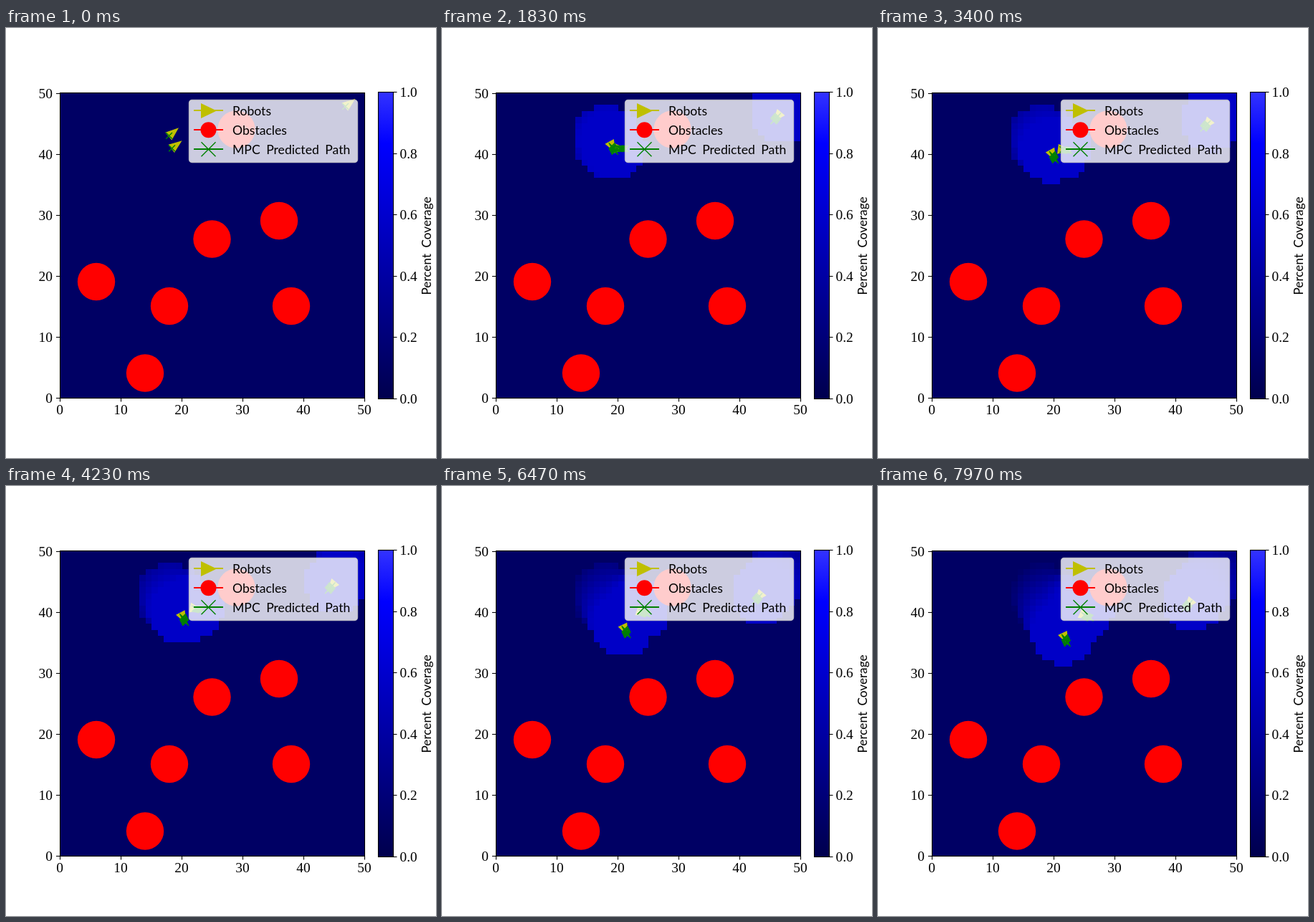
Recreate the animation shown at these times as an HTML page with a canvas. Size 600 px wide and 600 px high, loop 8000 ms.

```html
<!DOCTYPE html>
<html lang="en">
<head>
<meta charset="utf-8">
<title>Coverage map</title>
<style>
  html, body { margin: 0; width: 100%; height: 100%; overflow: hidden; background: #fff; }
  canvas, svg { position: absolute; left: 0; top: 0; width: 600px; height: 600px; }
  .tick { font: 19.4px "Liberation Serif", serif; }
  .label { font: 17.6px Lato, sans-serif; word-spacing: 4px; }
  .frame { fill: none; stroke: #000; stroke-width: 1.1; }
</style>
</head>
<body>
<canvas id="map" width="600" height="600"></canvas>
<svg viewBox="0 0 600 600">
  <defs>
    <linearGradient id="scale" x1="0" y1="1" x2="0" y2="0">
      <stop offset="0" stop-color="#00004d"/>
      <stop offset=".833" stop-color="#00f"/>
      <stop offset="1" stop-color="#3333ff"/>
    </linearGradient>
  </defs>
  <g id="obstacles" fill="red"></g>
  <rect class="frame" x="75.5" y="90.5" width="425" height="426"/>
  <rect class="frame" x="519.5" y="89.5" width="21" height="428" style="fill:url(#scale)"/>
  <g id="ticks"></g>
  <rect x="255.5" y="100.5" width="235" height="87" rx="4" fill="#fff" fill-opacity=".8" stroke="#ccc" stroke-opacity=".8" stroke-width="1.4"/>
  <g stroke-width="2">
    <path d="M262 115h41" stroke="#bfbf00"/>
    <path d="M262 142h41" stroke="red"/>
    <path d="M262 169h41" stroke="green"/>
  </g>
  <path d="M272 105v21l22-10.5z" fill="#bfbf00"/>
  <circle cx="282.5" cy="142.3" r="11" fill="red"/>
  <path d="M272.5 159.3l20 20m0-20l-20 20" stroke="green" stroke-width="1.4"/>
  <g class="label">
    <text x="316" y="122">Robots</text>
    <text x="316" y="149">Obstacles</text>
    <text x="316" y="176">MPC Predicted Path</text>
    <text transform="translate(592.5 304) rotate(-90)" text-anchor="middle" style="font-size:17.2px">Percent Coverage</text>
  </g>
</svg>
<script>
const FRAMES = 240, LOOP = 8000, GRID = 50;
const REACH_SQ = 26.5, FRESH = 0.57, BASE = 0.108, DECAY = 0.002;
const TURN = 4.2, RAMP = 30;
const px = x => 75 + 8.5 * x;
const py = y => 515.5 - 8.5 * y;
const colEdge = c => Math.round(px(c) + 0.5);
const rowEdge = r => Math.floor(py(r));

// Each robot turns clockwise to its goal heading, which then bends slowly
const robots = [
  { x: 17.95, y: 42.95, heading: 40, goal: -60, bend: -0.02, speed: 0.0335 },
  { x: 18.42, y: 40.9, heading: 37, goal: 4, bend: -0.12, speed: 0.0275 },
  { x: 46.9, y: 47.77, heading: 38, goal: -130, bend: 0, speed: 0.034 }
];

function drive({ x, y, heading, goal, bend, speed }) {
  const rad = Math.PI / 180;
  return Array.from({ length: FRAMES }, (_, f) => {
    const aim = goal + bend * f;
    const angle = Math.max(aim, heading - TURN * f) * rad;
    const step = speed * Math.min(1, f / RAMP);
    x += step * Math.cos(angle);
    y += step * Math.sin(angle);
    return { x, y, angle, aim: aim * rad };
  });
}
const paths = robots.map(drive);

const ctx = document.getElementById('map').getContext('2d');

function shade(value) {
  return `rgb(0,0,${Math.round(77 + 178 * value / 0.833)})`;
}

function drawCoverage(frame) {
  const seen = new Map();
  for (let f = 1; f <= frame; f++) {
    for (const path of paths) {
      const { x, y } = path[f];
      for (let c = Math.floor(x) - 6; c <= x + 6; c++) {
        for (let r = Math.floor(y) - 6; r <= y + 6; r++) {
          if (c < 0 || r < 0 || c >= GRID || r >= GRID) continue;
          if ((c + 0.5 - x) ** 2 + (r + 0.5 - y) ** 2 <= REACH_SQ) seen.set(r * GRID + c, f);
        }
      }
    }
  }
  ctx.fillStyle = shade(BASE);
  ctx.fillRect(75, 90, 426, 426);
  for (const [cell, last] of seen) {
    const c = cell % GRID, r = Math.floor(cell / GRID);
    const left = colEdge(c), top = rowEdge(r + 1);
    ctx.fillStyle = shade(Math.max(BASE, FRESH - DECAY * (frame - last)));
    ctx.fillRect(left, top, colEdge(c + 1) - left, rowEdge(r) - top);
  }
}

function drawArrow({ x, y, angle }) {
  ctx.save();
  ctx.translate(px(x), py(y));
  ctx.rotate(-angle);
  ctx.beginPath();
  ctx.moveTo(-1, -7);
  ctx.lineTo(17.5, 0);
  ctx.lineTo(-1, 7);
  ctx.fillStyle = '#bfbf00';
  ctx.fill();
  ctx.restore();
}

function drawPrediction({ x, y, aim }, frame) {
  const reach = frame ? 15 : 0, half = 4.4;
  const at = d => [px(x) + d * Math.cos(aim), py(y) - d * Math.sin(aim)];
  ctx.strokeStyle = 'green';
  ctx.lineWidth = 2.1;
  ctx.beginPath();
  ctx.moveTo(...at(reach * 0.4));
  ctx.lineTo(...at(reach));
  ctx.stroke();
  ctx.lineWidth = 1.4;
  ctx.beginPath();
  for (let k = 4; k <= 10; k++) {
    const [cx, cy] = at(reach * k / 10);
    ctx.moveTo(cx - half, cy - half);
    ctx.lineTo(cx + half, cy + half);
    ctx.moveTo(cx + half, cy - half);
    ctx.lineTo(cx - half, cy + half);
  }
  ctx.stroke();
}

function draw(frame) {
  drawCoverage(frame);
  for (const path of paths) drawArrow(path[frame]);
  for (const path of paths) drawPrediction(path[frame], frame);
}

function buildStatics() {
  const spots = [[6, 19], [14, 4], [18, 15], [25, 26], [36, 29], [38, 15], [29, 44]];
  document.getElementById('obstacles').innerHTML =
    spots.map(([x, y]) => `<circle cx="${px(x)}" cy="${py(y)}" r="26.2"/>`).join('');

  const tick = (d, x, y, anchor, text) =>
    `<path class="frame" d="${d}"/><text class="tick" x="${x}" y="${y}" text-anchor="${anchor}">${text}</text>`;
  let out = '';
  for (let v = 0; v <= 50; v += 10) {
    const x = px(v) + 0.5, y = Math.round(py(v)) + 0.5;
    out += tick(`M${x} 516.5v5`, x - 0.5, 539, 'middle', v);
    out += tick(`M75 ${y}h-5`, 65, y + 6, 'end', v);
  }
  for (let i = 0; i <= 5; i++) {
    const y = Math.floor(517 - 85.5 * i) + 0.5;
    out += tick(`M540.5 ${y}h5`, 549.5, y + 6, 'start', (i / 5).toFixed(1));
  }
  document.getElementById('ticks').innerHTML = out;
}

let shown = -1;
const start = performance.now();
function play(now) {
  const t = Math.max(0, now - start) % LOOP;
  const frame = Math.min(FRAMES - 1, Math.floor((t + 5) * FRAMES / LOOP));
  if (frame !== shown) draw(shown = frame);
  requestAnimationFrame(play);
}

buildStatics();
draw(0);
requestAnimationFrame(play);
</script>
</body>
</html>
```
